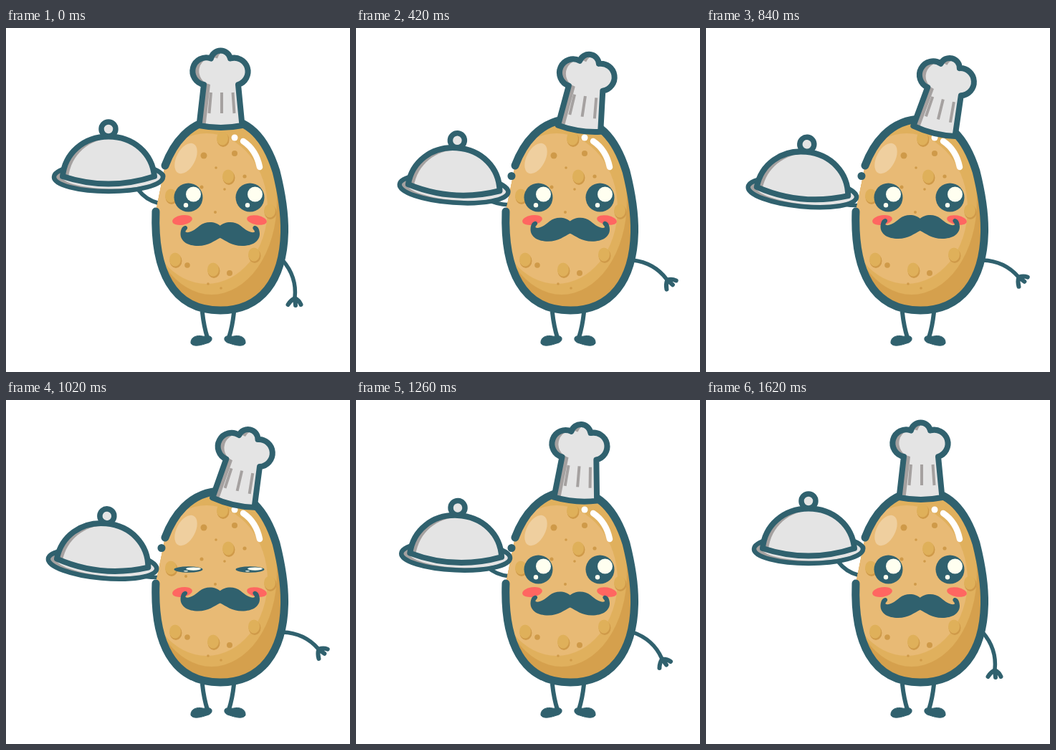
An HTML page that plays this animation: 480x480 px, repeating every 1650 ms.

```html
<!DOCTYPE html>
<html lang="en">
<head>
<meta charset="utf-8">
<title>Potato chef</title>
<style>
  html, body { margin: 0; height: 100%; overflow: hidden; background: #fff; }
  svg { display: block; width: 100vw; height: 100vh; }
  .line { fill: none; stroke: #30616e; stroke-linecap: round; stroke-linejoin: round; }
  .ink { fill: #30616e; }
  .light { fill: #e4e4e4; }
  .shade { fill: #a5a1a0; }
  .cream { fill: #fffff0; }
  .cheek { fill: #ff6661; }
  .spot { fill: #cf9a49; }
  .bump { fill: #dfb05a; }
</style>
</head>
<body>
<svg viewBox="0 0 480 480">
  <defs>
    <path id="skin" d="M222 192C232 165 255 127 302 127C345 127 366 165 377 200C385 232 389 260 388.500 285C387 352 356 394 299 394C232 394 206 338 209 256"/>
    <path id="hatShape" d="M276 79A19 19 0 1 1 286 42.500A13.800 13.800 0 0 1 313 42.500A19 19 0 1 1 324 79L329.500 136Q300 142 269.500 136Z"/>
    <path id="domeShape" d="M79 207C82 175 108 151.500 143 151.500C178 151.500 204 175 207 207Q143 228 79 207Z"/>
    <path id="whisker" d="M299.500 276.500C293 270 279 268.500 270 276C262 283 254 287 250.500 284.500C250 282 254 281 253 278C251 274 244 276 243.500 287C243.500 298 254 304 268 304C283 304 290 297 299.500 292.500Z"/>
    <path id="foot" d="M258 440C257 431 267 428 274 430C279 431 282 428 286 431C289 434 286 439 280 440C274 442 262 446 258 440Z"/>
    <g id="eyeShape">
      <circle class="ink" r="20"/>
      <circle class="cream" cx="7" cy="-4.500" r="10.500"/>
      <circle class="cream" cx="-3.500" cy="10.800" r="3.200"/>
    </g>
    <clipPath id="inSkin"><use href="#skin"/></clipPath>
    <clipPath id="inHat"><use href="#hatShape"/></clipPath>
    <clipPath id="inDome"><use href="#domeShape"/></clipPath>
  </defs>

  <g class="line" stroke-width="6">
    <path d="M274 397Q276 416 281 432M318 397Q316 416 311 432"/>
    <path id="trayArm" stroke-width="5.500"/>
    <g id="freeArm">
      <path stroke-width="5.500" d="M386 324Q406 347 403 376"/>
      <path d="M403 377Q397 380 393.500 386M403 377L404 387M403 377Q409 380 411.500 386"/>
    </g>
  </g>
  <g class="ink" stroke="#30616e">
    <use href="#foot"/>
    <use href="#foot" transform="matrix(-1 0 0 1 592 0)"/>
  </g>

  <g clip-path="url(#inSkin)">
    <rect x="200" y="120" width="200" height="280" fill="#d5a04d"/>
    <ellipse cx="287" cy="242" rx="91" ry="130" fill="#e0b05d"/>
    <ellipse cx="280" cy="252" rx="85" ry="105" fill="#e8ba75"/>
    <g id="spots"></g>
    <ellipse cx="251" cy="182" rx="13" ry="23" transform="rotate(28 251 182)" fill="#efcf9f"/>
  </g>
  <g fill="none" stroke="#fff" stroke-linecap="round">
    <path stroke-width="8.500" d="M331 158Q349 170 354 194"/>
    <path stroke-width="9" d="M319 153h.01"/>
  </g>
  <use href="#skin" class="line" stroke-width="11"/>
  <circle class="ink" cx="217" cy="206.500" r="5.500"/>

  <use id="leftEye" href="#eyeShape"/>
  <use id="rightEye" href="#eyeShape"/>
  <ellipse class="cheek" cx="246" cy="268" rx="14" ry="6.800" transform="rotate(-9 246 268)"/>
  <ellipse class="cheek" cx="350" cy="268" rx="14" ry="6.500" transform="rotate(10 350 268)"/>
  <g id="moustache" class="ink">
    <use href="#whisker"/>
    <use href="#whisker" transform="matrix(-1 0 0 1 597.500 0)"/>
  </g>

  <g id="hat">
    <use href="#hatShape" class="shade"/>
    <g clip-path="url(#inHat)"><use href="#hatShape" class="light" x="9"/></g>
    <path d="M286 90L283.500 119M301 90V119M316.500 90L318.500 119" fill="none" stroke="#a5a1a0" stroke-width="4"/>
    <use href="#hatShape" class="line" stroke-width="8"/>
  </g>

  <g id="tray">
    <ellipse class="shade" cx="143" cy="208" rx="76" ry="20"/>
    <ellipse class="light" cx="148" cy="206" rx="71" ry="18.500"/>
    <ellipse class="line" cx="143" cy="208" rx="76" ry="20" stroke-width="6.500"/>
    <use href="#domeShape" class="shade"/>
    <g clip-path="url(#inDome)"><use href="#domeShape" class="light" x="8" y="2"/></g>
    <use href="#domeShape" class="line" stroke-width="8"/>
    <circle class="light" cx="143" cy="141" r="10"/>
    <circle class="line" cx="143" cy="141" r="10" stroke-width="7.500"/>
  </g>
</svg>
<script>
const LOOP = 1650, STEP = 30;
const $ = id => document.getElementById(id);
const place = (id, transform) => $(id).setAttribute('transform', transform);

const bumps = [[310, 207], [302, 154], [230, 234], [368, 255], [236, 323], [289, 337], [346, 316]];
const dots = [[276, 178, 4.5], [319, 175, 4], [293, 195, 1.8], [333, 207, 2.6], [273, 222, 2.5], [305, 225, 1.8],
  [292, 257, 2], [251, 246, 2], [253, 331, 3.8], [312, 342, 4], [282, 357, 1.8], [300, 363, 1.8]];
$('spots').innerHTML =
  bumps.map(([x, y]) => `<ellipse class="spot" cx="${x + 1}" cy="${y + 2}" rx="8.500" ry="10"/>
    <ellipse class="bump" cx="${x}" cy="${y}" rx="8" ry="9.500"/>`).join('') +
  dots.map(([x, y, r]) => `<circle class="spot" cx="${x}" cy="${y}" r="${r}"/>`).join('');

const easeInOut = x => x <= 0 ? 0 : x >= 1 ? 1 : x < .5 ? 4 * x ** 3 : 1 - 4 * (1 - x) ** 3;

function draw(t) {
  const lean = t < 800 ? easeInOut(t / 770) : 1 - easeInOut((t - 830) / 770);
  const lower = 1 - (1 - lean) ** 1.4;
  const raise = 1 - (1 - lean) ** 2.4;
  const open = Math.min(1, .15 + Math.abs(t % (LOOP / 2) - 202.5) / 130);

  place('hat', `rotate(${13.8 * lean} 277 218)`);
  place('moustache', `translate(0 ${-10 * lean})`);
  place('tray', `translate(${-8.5 * lower} ${21 * lower}) rotate(${5.5 * lower} 143 207)`);
  place('freeArm', `rotate(${-47 * raise} 386 324)`);
  place('leftEye', `translate(254.500 236.500) scale(1 ${open})`);
  place('rightEye', `translate(340.500 236.500) scale(1 ${open})`);
  $('trayArm').setAttribute('d',
    `M184 ${225 + 19 * lower}Q195 ${240 + 8 * lower} 213 ${244.5 + 3 * lower}`);
}

const start = performance.now();
function tick() {
  const t = (performance.now() - start) % LOOP;
  draw(Math.floor(t / STEP) * STEP);
  requestAnimationFrame(tick);
}
tick();
</script>
</body>
</html>
```
